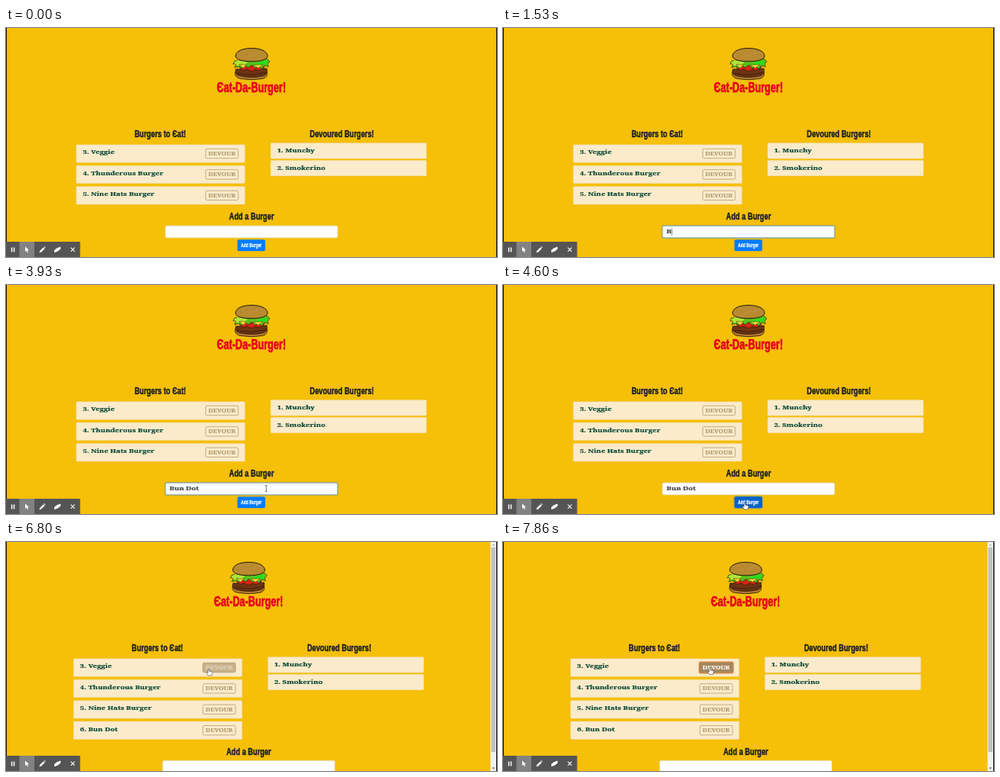
An HTML page with a canvas that plays this animation: 640 px wide and 300 px high, repeating every 8000 ms.

```html
<!DOCTYPE html>
<html lang="en">
<head>
<meta charset="utf-8">
<title>Burger list</title>
<style>
html, body { margin: 0; width: 100%; height: 100%; overflow: hidden; background: #f6bf08; }
canvas { display: block; width: 640px; height: 300px; }
</style>
</head>
<body>
<canvas id="stage"></canvas>
<script>
const LOOP = 8000;
const RELOAD = 5130;
const canvas = document.getElementById("stage");
const dpr = window.devicePixelRatio || 1;
canvas.width = 640 * dpr;
canvas.height = 300 * dpr;
const ctx = canvas.getContext("2d");

// Two display faces: a wide slab and a narrow heavy sans.
const SLAB = { family: '"Noto Serif", "Liberation Serif", serif', stretch: 1.25, weight: 0.3 };
const DISPLAY = { family: '"Liberation Sans", Arial, sans-serif', stretch: 0.7, weight: 0.5 };
const INK = "#212529", GREEN = "#0d4b39", TAN = "#b39b71";

const todo = ["3. Veggie", "4. Thunderous Burger", "5. Nine Hats Burger", "6. Bun Dot"];
const eaten = ["1. Munchy", "2. Smokerino"];
const typed = "Bun Dot";
const keyTimes = [1460, 1800, 2000, 2200, 2460, 2800, 3060];
const focusTime = 530, clickTime = 4530;

const clamp = v => Math.max(0, Math.min(1, v));
const progress = (t, a, b) => clamp((t - a) / (b - a));
const ease = p => p * p * (3 - 2 * p);
const lerp = (a, b, p) => a + (b - a) * p;
const mix = (a, b, p) => `rgb(${a.map((v, i) => Math.round(lerp(v, b[i], p))).join(",")})`;

function box(x, y, w, h, r, fill, stroke, width = 1) {
  ctx.beginPath();
  ctx.roundRect(x, y, w, h, r);
  if (fill) { ctx.fillStyle = fill; ctx.fill(); }
  if (stroke) { ctx.strokeStyle = stroke; ctx.lineWidth = width; ctx.stroke(); }
}

function write(face, text, x, y, size, color, align) {
  ctx.save();
  ctx.translate(x, y);
  ctx.scale(face.stretch, 1);
  ctx.font = `bold ${size}px ${face.family}`;
  ctx.textAlign = align;
  ctx.fillStyle = ctx.strokeStyle = color;
  ctx.lineWidth = face.weight * size / 12;
  ctx.lineJoin = "round";
  ctx.fillText(text, 0, 0);
  ctx.strokeText(text, 0, 0);
  const width = ctx.measureText(text).width * face.stretch;
  ctx.restore();
  return width;
}

const slab = (text, x, y, size, color, align = "left") => write(SLAB, text, x, y, size, color, align);
const heading = (text, x, y, size, color) => write(DISPLAY, text, x, y, size, color, "center");

function shape(path, fill, stroke, width = 0.8) {
  const p = new Path2D(path);
  if (fill) { ctx.fillStyle = fill; ctx.fill(p); }
  if (stroke) { ctx.strokeStyle = stroke; ctx.lineWidth = width; ctx.stroke(p); }
}

function burger() {
  ctx.lineJoin = "round";
  const line = "#201808";
  shape("M299 57Q297 65 306 66.5Q320 69 334 66.5Q342 65 340 57Z", "#b87a33", line);
  shape("M299.5 54Q298 61 304 62.5Q320 66.5 336 62.5Q341.5 60 340 53Z", "#6c3413", line);
  shape("M301 59Q320 64 339 58", null, "#3d1a08");
  shape("M304 51Q308 58 314 53.5Q320 59 325 54Q331 58 337 51L335 48L306 48Z", "#d92414", line, 0.6);
  shape("M298 43L296 47L300 47L298 52L304 50.5L307 53L311 49L316 52L320 48.5L325 53L329 49L333 54L337 49L342 51L341 47L344 44L340 40Z", "#58c21d", line, 0.6);
  shape("M297 45L302 50L306 47L310 49L315 45L303 42Z", "#b4e43a");
  shape("M326 48L331 51L335 47L341 49L339 43L329 45Z", "#24e01d");
  shape("M304 47.5L314 48.5L309 52.5ZM322 48.5L335 48L329 52.5Z", "#ffd935", line, 0.4);
  shape("M299.2 37C299.2 30.5 308 26.5 320 26.5C332 26.5 341 30.5 341 37C340 42 331 43.8 320 43.8C309 43.8 300 42 299.2 37Z", "#b98a30", line, 1);
  ctx.fillStyle = "#d2ab57";
  for (let i = 0; i < 14; i++) {
    ctx.fillRect(306 + (i * 11) % 28, 30 + (i * 5) % 8, 1, 0.6);
  }
}

function devourButton(y, hover, focus) {
  if (focus) box(258.6, y - 1.4, 45.8, 15.8, 2.5, "#d58a4c");
  const fill = hover ? mix([251, 235, 203], [166, 135, 92], hover) : null;
  const edge = mix([188, 164, 122], [166, 135, 92], hover * hover);
  box(260.3, y + 0.3, 42.4, 12.4, 1.5, fill, edge, 0.9);
  const text = hover ? mix([179, 155, 113], [255, 255, 255], hover) : TAN;
  slab("DEVOUR", 281.5, y + 9, 6.6, text, "center");
}

function lists(t) {
  const count = t < RELOAD ? 3 : 4;
  const hover = 0.58 * progress(t, 6730, 6800) + 0.42 * progress(t, 6800, 6930);
  for (let i = 0; i < count; i++) {
    const y = 152.9 + i * 27.4;
    box(91.7, y, 219.6, 23.3, 1, "#fbebcb", "#efdba9", 0.6);
    slab(todo[i], 100.2, y + 12.5, 7.6, GREEN);
    devourButton(y + 5.1, i ? 0 : hover, !i && t >= 7530);
  }
  eaten.forEach((name, i) => {
    const y = 150.8 + i * 22.6;
    box(345, y, 203, 20.3, 1, "#fbebcb", "#efdba9", 0.6);
    slab(name, 353.4, y + 12.6, 7.6, GREEN);
  });
}

function form(t) {
  const loaded = t >= RELOAD;
  const dy = loaded ? 27.4 : 0;
  const focused = t >= focusTime && t < clickTime;
  heading("Add a Burger", 320, 251.3 + dy, 13.2, INK);

  const y = 259.2 + dy;
  if (focused) box(206.7, y - 1.2, 226.6, 18, 2.5, "#b8ae48");
  box(207.9, y, 224.2, 15.6, 1.8, focused ? "#fafcff" : "#fdfdff", focused ? "#6fa4ae" : "#e6e2d0", 0.8);

  if (!loaded) {
    const n = keyTimes.filter(k => k <= t).length;
    const width = n ? slab(typed.slice(0, n), 213, 269.4, 7.6, "#454545") : 0;
    const last = n ? keyTimes[n - 1] : focusTime;
    if (focused && (t - last) % 1000 < 500) {
      ctx.fillStyle = "#333";
      ctx.fillRect(213.3 + width, 262.8, 0.7, 8.6);
    }
  }

  const hover = loaded ? 0 : progress(t, 4200, 4350);
  const clicked = !loaded && t >= clickTime;
  if (clicked) box(300.3, 275.8 + dy, 38.9, 17.8, 3, "#b8ae48");
  box(301.6, 277.2 + dy, 36.3, 15, 2, mix([0, 123, 255], [0, 98, 204], hover));
  heading("Add Burger", 319.8, 287.2 + dy, 7, "#fff");
}

function scrollbar() {
  ctx.fillStyle = "#f1f1f1";
  ctx.fillRect(631.5, 0, 7.5, 300);
  ctx.fillStyle = "#c1c1c1";
  ctx.fillRect(632.5, 7, 5.5, 268);
  shape("M633.5 4.5L635.2 2.5L637 4.5Z", "#a3a3a3");
  shape("M633.5 295.5L635.2 297.5L637 295.5Z", "#505050");
}

function toolbar() {
  ctx.fillStyle = "#555";
  ctx.fillRect(0, 280, 96.6, 20);
  ctx.fillStyle = "#828282";
  ctx.fillRect(17.5, 280, 19.5, 20);
  ctx.fillStyle = "#fff";
  ctx.fillRect(6.8, 287.5, 1.5, 6);
  ctx.fillRect(9.8, 287.5, 1.5, 6);
  shape("M25 286.5L25 293L26.6 291.7L27.8 294.3L28.9 293.8L27.8 291.3L30 291Z", "#fff");
  shape("M43.5 294.2L44 292L48.6 287.4L50.4 289.2L45.8 293.8ZM49.2 286.8L50 286L51.6 287.8L50.9 288.6Z", "#fff");
  shape("M63 291L66 288.6L71.2 286.6L71.2 289.4L67.6 292.4L63 294.2Z", "#fff");
  shape("M84.5 287.7L89.5 292.8M89.5 287.7L84.5 292.8", null, "#fff", 1.1);
}

function arrow(x, y) {
  ctx.save();
  ctx.translate(x, y);
  shape("M0 0L0 6.6L1.5 5.3L2.6 7.8L3.8 7.2L2.8 4.9L4.8 4.8Z", "#fff", "#555", 0.6);
  ctx.restore();
}

function beam(x, y) {
  ctx.save();
  ctx.translate(x, y);
  shape("M-1.5 -4L1.5 -4M0 -4L0 4M-1.5 4L1.5 4", null, "#444", 0.7);
  ctx.restore();
}

function hand(x, y) {
  ctx.save();
  ctx.translate(x, y);
  shape("M-.8 .6Q0 -.5 .8 .6L.9 3.2L4.2 4Q5.1 4.4 4.9 5.6L4.2 9L-.4 9L-2.7 5.6Q-2.8 4.4 -1.6 4.8L-.8 5.6Z", "#fff", "#333", 0.55);
  ctx.restore();
}

function pointer(t) {
  if (t < 3860) return;
  if (t < RELOAD) {
    const p = ease(progress(t, 3860, 4530));
    const x = lerp(340, 315, p), y = lerp(266, 285, p);
    return y < 276 ? beam(x, y) : hand(x, y);
  }
  if (t < 6000) return arrow(lerp(312, 306, progress(t, 5930, 6000)), 287.5);
  if (t < 6730) {
    const p = ease(progress(t, 6000, 6800));
    return arrow(lerp(306, 264, p), lerp(287.5, 166, p));
  }
  const p = ease(progress(t, 6800, 7200));
  hand(lerp(264, 269.5, p), lerp(166, 164.5, p));
}

function draw(t) {
  const loaded = t >= RELOAD;
  ctx.setTransform(dpr, 0, 0, dpr, 0, 0);
  ctx.fillStyle = "#f6bf08";
  ctx.fillRect(0, 0, 640, 300);

  ctx.save();
  if (loaded) ctx.translate(-3.6, 0);
  burger();
  heading("Єat-Da-Burger!", 319.8, 83.5, 18, "#e8041a");
  heading("Burgers to Єat!", 201, 143.4, 13.2, INK);
  heading("Devoured Burgers!", 437.8, 143.4, 13.2, INK);
  lists(t);
  form(t);
  ctx.restore();

  if (loaded) scrollbar();
  ctx.fillStyle = "#0c0902";
  ctx.fillRect(0, 0, 1, 300);
  ctx.fillRect(639, 0, 1, 300);
  toolbar();
  pointer(t);
}

const start = performance.now();
function frame() {
  draw((performance.now() - start) % LOOP);
  requestAnimationFrame(frame);
}
frame();
</script>
</body>
</html>
```
